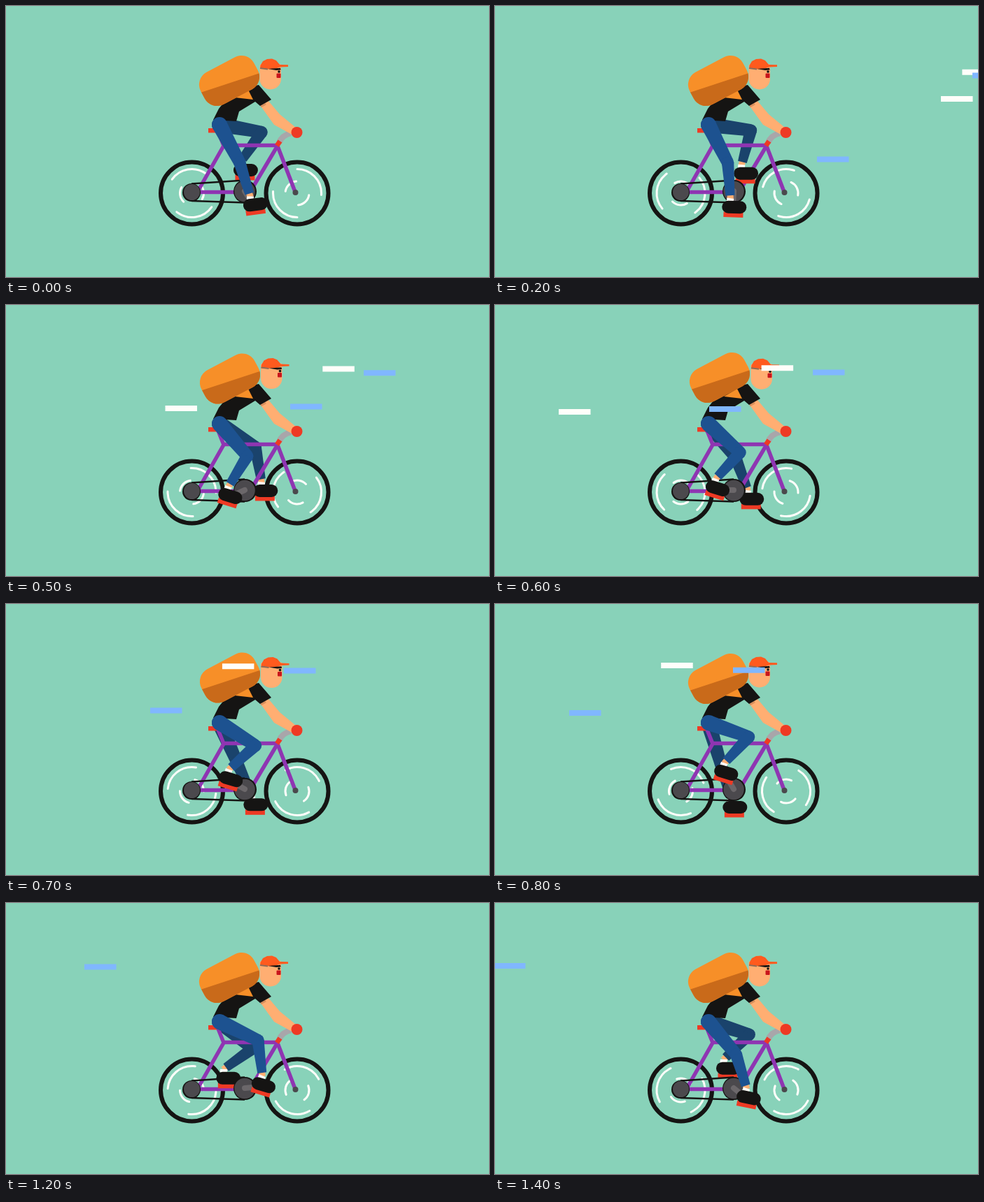
An HTML page with a canvas that plays this animation: 690 px wide and 388 px high, repeating every 1500 ms.

```html
<!DOCTYPE html>
<html lang="en">
<head>
<meta charset="utf-8">
<title>Cyclist</title>
<style>
html, body { margin: 0; width: 100%; height: 100%; overflow: hidden; background: #88d2b9; }
canvas { display: block; }
</style>
</head>
<body>
<canvas id="stage" width="690" height="388"></canvas>
<script>
const ctx = document.getElementById('stage').getContext('2d');
const LOOP = 1500, STEP = 100, RAD = Math.PI / 180;
const HIP = [305, 170], THIGH = 61, SHIN = 50;
const C = {
  bg: '#88d2b9', black: '#151413', near: '#1d5290', far: '#1a436c', skin: '#ffae72',
  red: '#ee3a24', purple: '#8f35b2', metal: '#4b494d', white: '#fffefa', sky: '#80b7ff',
  orange: '#f78f28', rust: '#c96a1a', cap: '#ff5a1e'
};

// Wind lines: place at 400 ms and travel per step
const streaks = [
  { x: 524, y: 88.5, vx: -71.7, vy: -1.1, color: C.white },
  { x: 568, y: 94, vx: -57, vy: -.8, color: C.sky },
  { x: 364, y: 139, vx: -136.5, vy: 5, color: C.white },
  { x: 506, y: 138, vx: -100, vy: 3.5, color: C.sky },
  { x: 60, y: 215.5, vx: -200, vy: 0, color: C.sky }
];

function poly(color, ...p) {
  ctx.fillStyle = color;
  ctx.beginPath();
  for (let i = 0; i < p.length; i += 2) ctx.lineTo(p[i], p[i + 1]);
  ctx.closePath();
  ctx.fill();
}

function line(color, width, ...p) {
  ctx.strokeStyle = color;
  ctx.lineWidth = width;
  ctx.beginPath();
  for (let i = 0; i < p.length; i += 2) ctx.lineTo(p[i], p[i + 1]);
  ctx.stroke();
}

function disc(color, x, y, r) {
  ctx.fillStyle = color;
  ctx.beginPath();
  ctx.arc(x, y, r, 0, 7);
  ctx.fill();
}

function box(color, x, y, w, h, r = 0) {
  ctx.fillStyle = color;
  ctx.beginPath();
  ctx.roundRect(x, y, w, h, r);
  ctx.fill();
}

function arc(color, width, x, y, r, mid, span) {
  ctx.strokeStyle = color;
  ctx.lineWidth = width;
  ctx.beginPath();
  ctx.arc(x, y, r, (mid - span / 2) * RAD, (mid + span / 2) * RAD);
  ctx.stroke();
}

function placed(x, y, deg, draw) {
  ctx.save();
  ctx.translate(x, y);
  ctx.rotate(deg * RAD);
  draw();
  ctx.restore();
}

function taper(color, [x1, y1], r1, [x2, y2], r2) {
  const a = Math.atan2(y2 - y1, x2 - x1), nx = -Math.sin(a), ny = Math.cos(a);
  poly(color, x1 + nx * r1, y1 + ny * r1, x2 + nx * r2, y2 + ny * r2,
    x2 - nx * r2, y2 - ny * r2, x1 - nx * r1, y1 - ny * r1);
}

// A foot circles the crank; the ankle follows its tilt and the knee bends to fit
function pose(angle, radius, tilt) {
  const x = 343 + radius * Math.cos(angle * RAD), y = 263 + radius * Math.sin(angle * RAD);
  const c = Math.cos(tilt * RAD), s = Math.sin(tilt * RAD);
  const at = (px, py) => [x + px * c - py * s, y + px * s + py * c];
  const ankle = at(-6, -13.5), dx = ankle[0] - HIP[0], dy = ankle[1] - HIP[1];
  const d = Math.min(Math.hypot(dx, dy), THIGH + SHIN);
  const bend = Math.acos((THIGH ** 2 + d * d - SHIN ** 2) / (2 * THIGH * d));
  const a = Math.atan2(dy, dx) - bend;
  const knee = [HIP[0] + THIGH * Math.cos(a), HIP[1] + THIGH * Math.sin(a)];
  return { x, y, tilt, ankle, knee, heel: at(-7, -3) };
}

function leg(color, { ankle: [ax, ay], knee, heel }) {
  const a = Math.atan2(ay - knee[1], ax - knee[0]);
  const along = k => [ax + k * Math.cos(a), ay + k * Math.sin(a)];
  line(C.skin, 9, ...along(-6), ...along(2));
  line(C.white, 10, ...along(1), ...heel);
  disc(color, ...HIP, 11);
  taper(color, HIP, 11, knee, 8.7);
  disc(color, ...knee, 8.7);
  taper(color, knee, 8.7, along(-3), 6.5);
}

function shoe({ x, y, tilt }) {
  placed(x, y, tilt, () => {
    box(C.red, -15, 7, 28, 7.5);
    box(C.black, -17.5, -9, 35, 18, 9);
  });
}

function wheel(x, angle) {
  arc(C.black, 6, x, 268, 44.5, 0, 360);
  ctx.lineCap = 'round';
  for (const half of [0, 180]) {
    arc(C.white, 3, x, 268, 34.5, angle + half, 94);
    arc(C.white, 3, x, 268, 17, angle + half + 90, 76);
  }
  ctx.lineCap = 'butt';
}

function frame() {
  box(C.red, 289, 175, 14, 6.5);
  line(C.purple, 5.5, 303, 180, 311, 200, 273, 267);
  line(C.purple, 5.5, 270, 266.5, 336, 266.5);
  line(C.purple, 5.5, 309, 199.5, 388, 199.5);
  line(C.purple, 5.5, 388, 200, 350, 264);
  line(C.purple, 5.5, 387, 198, 413, 266);
  disc(C.metal, 413.5, 267, 4);
  ctx.strokeStyle = '#a8a6aa';
  ctx.lineWidth = 8;
  ctx.beginPath();
  ctx.moveTo(390, 196);
  ctx.quadraticCurveTo(394, 185, 407, 182);
  ctx.stroke();
  line(C.red, 7, 387, 200, 391.5, 193.5);
}

function drivetrain(angle) {
  line(C.black, 2.5, 265, 254.5, 341, 249.5);
  line(C.black, 2.5, 265, 279, 341, 281.5);
  disc(C.black, 265, 267, 13);
  disc(C.metal, 265.5, 266.5, 11.5);
  disc(C.black, 341.5, 265.5, 16.5);
  disc(C.metal, 341, 265.5, 14.8);
  ctx.lineCap = 'round';
  placed(341, 265, angle, () => line('#6b676a', 8, 0, 0, 16, 0));
  ctx.lineCap = 'butt';
}

function torso() {
  poly(C.skin, 363, 142, 375, 136, 391, 155, 414, 174, 412, 186, 383, 170);
  line('#d98f5c', 3, 364, 144, 371, 140);
  disc(C.red, 415.5, 181, 8);
  poly(C.black, 296, 163, 304, 147, 316, 132, 347, 116, 361, 113, 379, 134, 363, 143,
    356, 137, 333, 151, 329, 165);
  poly(C.orange, 327, 131, 346, 120, 353, 134);
}

function head(shift) {
  placed(shift, shift * .4, 0, () => {
    box(C.skin, 362.5, 83, 30.5, 36.5, [3, 2, 15, 15]);
    poly(C.cap, 363, 90, 363.5, 85, 367, 79, 373, 76, 380, 75.5, 386, 78, 391, 84,
      403, 84.3, 403, 87, 391, 87.5, 384, 90);
    line('#8d6d58', 2, 363, 89, 374, 90.5);
    poly(C.black, 374, 90, 392, 88.7, 392.5, 91.5, 386, 92);
    disc(C.black, 390, 94, 1.8);
    box('#c9151c', 386.5, 96.5, 6, 6.5, 1);
  });
}

function pack(lift) {
  placed(319 + lift * 2, 107 - lift * 3, -28, () => {
    ctx.beginPath();
    ctx.roundRect(-43, -26, 86, 52, 20);
    ctx.clip();
    box(C.orange, -45, -30, 90, 60);
    poly(C.rust, -45, -4.5, 45, 11, 45, 30, -45, 30);
  });
}

function render(t) {
  const turn = 2 * Math.PI * t / LOOP;
  // The pedals slow down through the bottom of the near stroke
  const crank = turn / RAD + 51 - 16 * Math.sin(turn - .44);
  const push = Math.max(0, Math.cos(turn - .33)) ** 6;
  const near = pose(crank, 25, 17 - 34 * push);
  const far = pose(crank - 149, 28, 0);
  const spin = 2.5 * turn / RAD + 92 + 45 * Math.cos(turn);
  const lift = t > 400 && t < 1200 ? Math.sin(Math.PI * (t - 400) / 400) ** 2 : 0;

  box(C.bg, 0, 0, 690, 388);
  wheel(265.5, spin - 55);
  wheel(416, spin);
  leg(C.far, far);
  frame();
  shoe(far);
  drivetrain(crank);
  torso();
  head(lift * 3);
  pack(lift);
  leg(C.near, near);
  shoe(near);
  const k = (t - 400) / STEP;
  for (const s of streaks) box(s.color, s.x + s.vx * k, s.y + s.vy * k, 45.5, 8);
}

function tick(now) {
  render(Math.floor(now % LOOP / STEP) * STEP);
  requestAnimationFrame(tick);
}
tick(performance.now());
</script>
</body>
</html>
```
